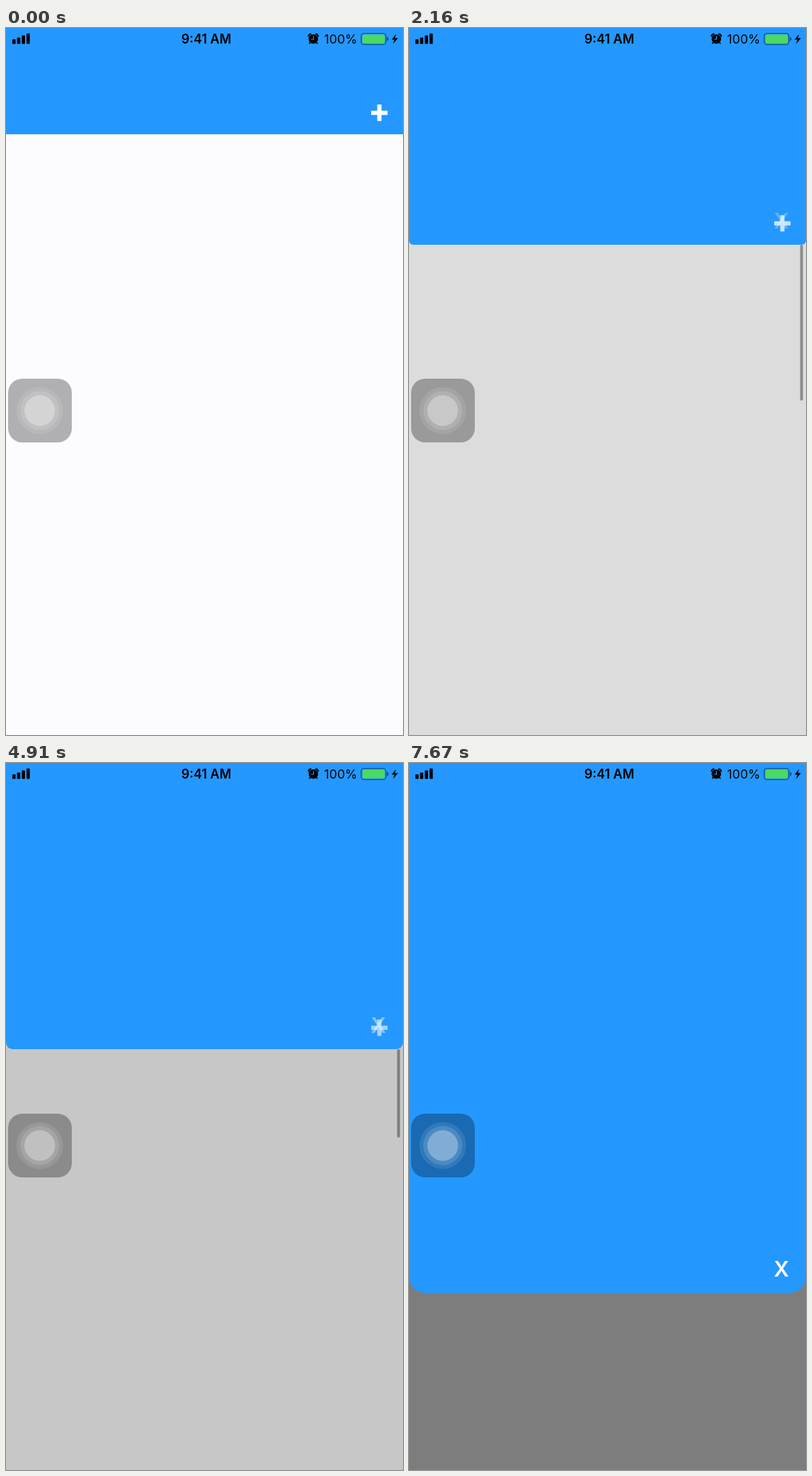
An HTML page for the animation above (8000 ms loop, 561 px wide and 998 px high).

```html
<!DOCTYPE html>
<html lang="en">
<head>
<meta charset="utf-8">
<title>Pull-down header</title>
<style>
  html, body { margin: 0; width: 100%; height: 100%; overflow: hidden; background: #fcfcfe; }
  svg { display: block; width: 100%; height: 100%; }
  text { font-family: Inter, Roboto, sans-serif; text-anchor: middle; }
</style>
</head>
<body>
<svg viewBox="0 0 561 998">
  <rect width="561" height="998" fill="#fcfcfe"/>
  <rect id="dim" width="561" height="998"/>
  <path id="header" fill="#2498ff"/>
  <g id="icons" fill="#fff">
    <path id="plus" d="M516 -33.3h8.6v-8.6h6v8.6h8.6v6h-8.6v8.6h-6v-8.6h-8.6z"/>
    <text id="close" x="526.3" y="-23" font-size="30" font-weight="600">X</text>
  </g>
  <rect id="bar" x="552.7" width="4" rx="2"/>

  <g id="statusBar">
    <rect x="9" y="16" width="4.6" height="6.5" rx="1"/>
    <rect x="15.6" y="13.4" width="4.6" height="9.1" rx="1"/>
    <rect x="22.3" y="10.6" width="4.6" height="11.9" rx="1"/>
    <rect x="29" y="7.8" width="4.6" height="14.7" rx="1"/>
    <text x="283" y="22" font-size="18" font-weight="600">9:41 AM</text>
    <g>
      <circle cx="434.3" cy="15.6" r="6.7"/>
      <path d="M427.6 12.3a3 3 0 0 1 3.8-3.6M437.2 8.7a3 3 0 0 1 3.8 3.6" fill="none" stroke="#000" stroke-width="2"/>
      <path d="M429.8 20.5l-1.4 1.7M438.8 20.5l1.4 1.7" stroke="#000" stroke-width="1.6"/>
      <path d="M434.5 11.2v4.8h-3.3" fill="none" stroke="#2498ff" stroke-width="1.2"/>
    </g>
    <text x="473" y="22" font-size="17.7">100%</text>
    <rect x="502" y="7.6" width="34.8" height="15.8" rx="4" fill="none" stroke="#000" stroke-opacity=".45" stroke-width="1.4"/>
    <rect x="503.6" y="9.2" width="31.6" height="12.6" rx="2.6" fill="#4cd964"/>
    <path d="M538.4 12.6q2.2 .6 2.2 2.9t-2.2 2.9z" opacity=".5"/>
    <path d="M551.2 8.6l-6.3 7.8h4l-1.9 6 6.8-8.2h-4.2z"/>
  </g>

  <g id="touchButton">
    <rect x="3" y="495" width="90" height="90" rx="20" opacity=".3"/>
    <g fill="#fff">
      <circle cx="47.7" cy="540" r="33" opacity=".1"/>
      <circle cx="47.7" cy="540" r="27.5" opacity=".13"/>
      <circle cx="47.7" cy="540" r="21.7" opacity=".3"/>
    </g>
  </g>
</svg>
<script>
  const LOOP = 8000, RELEASE = 5000;
  const CLOSED = 150, OPEN = 748, HELD = 404;
  const SPRING = 10.8; // critically damped, per second
  const drag = [[160, CLOSED], [1360, 244], [2160, 306], [3140, 343], [4910, HELD]];

  const $ = id => document.getElementById(id);
  const set = (id, attrs) => {
    for (const name in attrs) $(id).setAttribute(name, attrs[name]);
  };
  const clamp = v => Math.max(0, Math.min(1, v));

  function headerHeight(t) {
    if (t > RELEASE) {
      const s = SPRING * (t - RELEASE) / 1000;
      return OPEN - (OPEN - HELD) * (1 + s) * Math.exp(-s);
    }
    let h = CLOSED;
    for (let i = 1; i < drag.length; i++) {
      const [t0, h0] = drag[i - 1], [t1, h1] = drag[i];
      h += (h1 - h0) * clamp((t - t0) / (t1 - t0));
    }
    return h;
  }

  // The scroll indicator is squeezed by the overscroll, then shrinks more slowly.
  const barLength = h => Math.max(12, h < 343 ? 832 - 2 * h : 146 - 0.35 * (h - 343));

  function render(t) {
    const h = headerHeight(t);
    const p = (h - CLOSED) / (OPEN - CLOSED);
    const r = 23 * p;
    set("dim", { opacity: p / 2 });
    set("header", {
      d: `M0 0H561V${h - r}A${r} ${r} 0 0 1 ${561 - r} ${h}H${r}A${r} ${r} 0 0 1 0 ${h - r}Z`
    });
    set("icons", { transform: `translate(0 ${h})` });
    set("plus", { opacity: t > 5400 ? 0 : 1 - p });
    set("close", { opacity: p });
    const shown = clamp((t - 160) / 40) * (1 - clamp((t - RELEASE) / 300));
    set("bar", { y: h, height: barLength(h), opacity: 0.36 * shown });
  }

  const start = performance.now();
  function tick() {
    render((performance.now() - start) % LOOP);
    requestAnimationFrame(tick);
  }
  tick();
</script>
</body>
</html>
```
